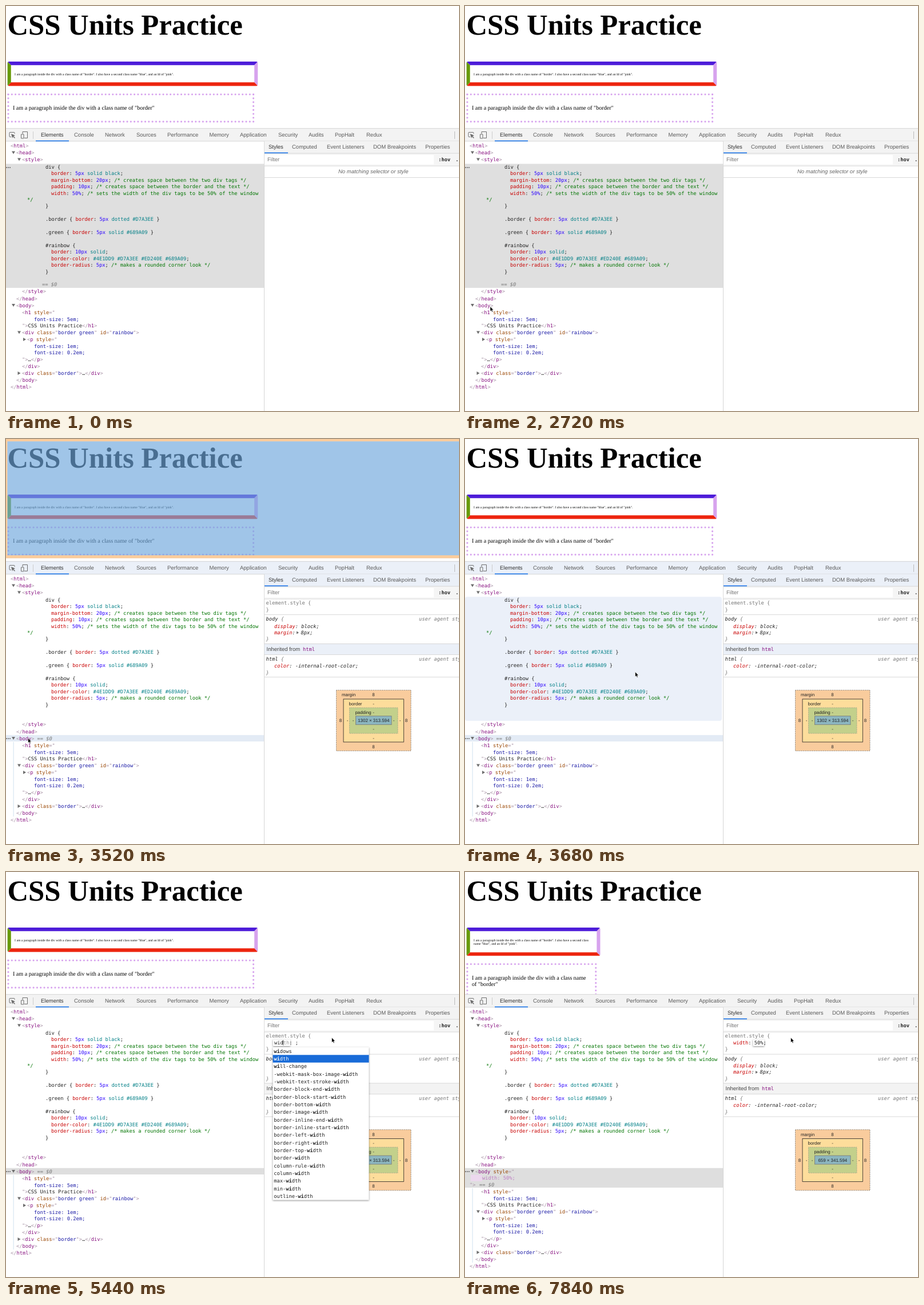
Recreate the animation shown at these times as an HTML page. Size 792x707 px, loop 8000 ms.

```html
<!DOCTYPE html>
<html lang="en">
<head>
<meta charset="utf-8">
<title>CSS Units Practice</title>
<style>
html, body { margin: 0; width: 100%; height: 100%; overflow: hidden; background: #fff; }
svg { display: block; }
text { white-space: pre; text-rendering: geometricPrecision; }
.m { font: 8.72px "DejaVu Sans Mono", monospace; }
.s { font: 9.5px "Liberation Sans", sans-serif; }
.x { font: 7.92px "Liberation Sans", sans-serif; text-anchor: middle; }
.p { font: 10.15px "Liberation Serif", serif; }
.q { font: 5.71px "Liberation Serif", serif; }
.h { font: bold 50.72px "Liberation Serif", serif; }
.i { font-style: italic; }
.b { font-weight: bold; }
.shadow { filter: drop-shadow(0 1px 1.5px rgba(0, 0, 0, .45)); }
</style>
</head>
<body>
<svg id="stage" width="792" height="707"></svg>
<script>
const stage = document.getElementById('stage');
const LOOP = 8000, STEP = 160, S = 0.634, CH = 5.25;

// Colour codes used inside strings as ~code
const INK = {
  b: '#a894a6', t: '#881280', a: '#994500', v: '#1a1aa6', k: '#222', r: '#c80000',
  n: '#2a00ff', l: '#007f86', c: '#007400', g: '#777', d: '#999'
};
const esc = s => s.replace(/&/g, '&amp;').replace(/</g, '&lt;');
const rect = (x, y, w, h, fill, more = '') =>
  `<rect x="${x}" y="${y}" width="${w}" height="${h}" fill="${fill}" ${more}/>`;
const path = (d, fill, more = '') => `<path d="${d}" fill="${fill}" ${more}/>`;

function text(x, y, s, cls = 'm', fill = INK.k) {
  const [first, ...rest] = s.split(/~(\w)/);
  let out = esc(first);
  for (let i = 0; i < rest.length; i += 2)
    out += `<tspan fill="${INK[rest[i]]}">${esc(rest[i + 1])}</tspan>`;
  return `<text x="${x}" y="${y}" class="${cls}" fill="${fill}">${out}</text>`;
}
const code = (x, mid, s, cls = '') => text(x, mid + 3, s, 'm ' + cls);
const open = (x, y) => path(`M${x} ${y - 2.5}h6l-3 5z`, '#6e6e6e');
const shut = (x, y) => path(`M${x} ${y - 3}v6l5 -3z`, '#6e6e6e');

// ---- web page ----
function rainbow(x, y, w, h) {
  const b = 10 * S, r = x + w, e = y + h;
  const side = (a, c) => `<polygon points="${a}" fill="${c}"/>`;
  return `<clipPath id="round">${rect(x, y, w, h, '#000', 'rx="3.2"')}</clipPath><g clip-path="url(#round)">` +
    side([x, y, r, y, r - b, y + b, x + b, y + b], '#4E1DD9') +
    side([r, y, r, e, r - b, e - b, r - b, y + b], '#D7A3EE') +
    side([r, e, x, e, x + b, e - b, r - b, e - b], '#ED240E') +
    side([x, e, x, y, x + b, y + b, x + b, e - b], '#689A09') + '</g>';
}

function dotted(x, y, w, h) {
  const b = 5 * S, x1 = x + b / 2, y1 = y + b / 2, W = w - b, H = h - b;
  const line = (d, len) => path(d, 'none', `stroke="#D7A3EE" stroke-width="${b}" stroke-linecap="round"
    stroke-dasharray="0 ${len / Math.round(len / (2 * b))}"`);
  return line(`M${x1} ${y1}h${W}`, W) + line(`M${x1} ${y1 + H}h${W}`, W) +
    line(`M${x1} ${y1}v${H}`, H) + line(`M${x1 + W} ${y1}v${H}`, H);
}

function page(width, overlay) {
  const x = 2.4, top = 50.3;
  if (width && width !== '50%')
    return ['CSS', 'Units', 'Practice'].map((s, i) => text(x, top + 92 * S * i, s, 'h', '#000')).join('');
  const half = width === '50%', body = half ? 659 : 1302;
  const small = 'I am a paragraph inside the div with a class name of "border". I also have a second class';
  const small2 = 'name "blue", and an Id of "pink".';
  const big = 'I am a paragraph inside the div with a class name', big2 = 'of "border"';
  const p = (y, s, cls) => text(x + (cls === 'p' ? 15 : 20) * S, y, s, cls, '#000');
  let out = text(x, top, 'CSS Units Practice', 'h', '#000') +
    rainbow(x, 97, (body / 2 + 40) * S, half ? 49.5 : 42.7) +
    dotted(x, half ? 159.2 : 152.7, (body / 2 + 30) * S, half ? 62.3 : 50.7);
  out += half
    ? p(120.7, small, 'q') + p(127.2, small2, 'q') + p(187.7, big, 'p') + p(199.3, big2, 'p')
    : p(120.7, small + ' ' + small2, 'q') + p(181.4, big + ' ' + big2, 'p');
  if (overlay) {
    out += path(`M0 0H792V208.2H0zM${x} 4.2V203H792V4.2z`, '#f9cc9d', 'fill-rule="evenodd"') +
      rect(x, 4.2, 790, 198.8, 'rgb(111,168,220)', 'opacity=".66"');
  }
  return out;
}

// ---- toolbar ----
function toolbar(bar) {
  const tabs = [['Elements', 61], ['Console', 119], ['Network', 173], ['Sources', 228], ['Performance', 282],
    ['Memory', 355.5], ['Application', 409], ['Security', 476], ['Audits', 529], ['PopHalt', 575], ['Redux', 630]];
  const line = 'stroke="#6e6e6e" stroke-width="1"';
  return rect(0, 213.4, 792, 494, '#fff') + rect(0, 213.4, 792, 22.6, bar) +
    rect(0, 213.4, 792, .8, '#ccc') + rect(0, 235.6, 792, .8, '#ccc') +
    path('M9 228.5H7q-1 0-1-1V221.5q0-1 1-1H14q1 0 1 1V223', 'none', line) +
    path('M9 223L16 226L13.3 227.2L16 230L15 231L12.2 228.3L11 230.8z', '#6e6e6e') +
    path('M29 223V219.5H37.5V230.5H32M26.5 224H31V231H26.5z', 'none', line) +
    rect(47, 219, 1, 13, '#ccc') + rect(784, 219, 1, 13, '#bbb') +
    rect(52, 234.7, 58, 1.6, '#1a73e8') +
    tabs.map(([s, x], i) => text(x, 228.4, s, 's', i ? '#5a5a5a' : '#333')).join('');
}

// ---- element tree ----
const SHEET = [
  [69, 'div {'],
  [79, '~rborder~k: ~n5px~l solid black~k;'],
  [79, '~rmargin-bottom~k: ~n20px~k; ~c/* creates space between the two div tags */'],
  [79, '~rpadding~k: ~n10px~k; ~c/* creates space between the border and the text */'],
  [79, '~rwidth~k: ~n50%~k; ~c/* sets the width of the div tags to be 50% of the window'],
  [37, '~c*/'],
  [69, '}'], null,
  [69, '.border { ~rborder~k: ~n5px~l dotted #D7A3EE~k }'], null,
  [69, '.green { ~rborder~k: ~n5px~l solid #689A09~k }'], null,
  [69, '#rainbow {'],
  [79, '~rborder~k: ~n10px~l solid~k;'],
  [79, '~rborder-color~k: ~l#4E1DD9 #D7A3EE #ED240E #689A09~k;'],
  [79, '~rborder-radius~k: ~n5px~k; ~c/* makes a rounded corner look */'],
  [69, '}']
];
const tag = name => `~b<~t${name}~b>`;
const end = name => `~b</~t${name}~b>`;
const attr = (name, val) => ` ~a${name}~b="~v${val}~b"`;
const REST = [
  [28, 535, '~b<~th1 ~astyle~b="'],
  [49, 546.5, '~vfont-size: 5em;'],
  [28, 558, '~b">~kCSS Units Practice' + end('h1')],
  [28, 570, '~b<~tdiv' + attr('class', 'border green') + attr('id', 'rainbow') + '>'],
  [37, 582, '~b<~tp ~astyle~b="'],
  [49, 593.5, '~vfont-size: 1em;'],
  [49, 605, '~vfont-size: 0.2em;'],
  [28, 616.5, '~b">~k…' + end('p')],
  [28, 628.5, end('div')],
  [28, 641, '~b<~tdiv' + attr('class', 'border') + '>~k…' + end('div')],
  [18, 653, end('body')],
  [8, 665, end('html')]
];
const dots = y => [1, 4, 7].map(x => `<circle cx="${x}" cy="${y}" r=".9" fill="#555"/>`).join('');

function tree(s) {
  const drop = s.width ? 23 : 0;
  let out = '';
  if (!s.picked) out += rect(0, 275.5, 451, 216.5, s.hover ? '#cfe6fa' : '#dfdfdf') + dots(282);
  else if (s.overSheet) out += rect(0, 275.5, 449, 216.5, '#ebf0f9', 'rx="4"');
  if (s.picked) out += rect(0, 516.8, 451, 11.2 + drop, s.tint ? '#e3ebf5' : '#dedede') + dots(523);
  else if (s.hover) out += rect(0, 516.5, 449, 12.5, '#ebf1fb', 'rx="5"');
  if (s.picked || s.hover) out += rect(12.6, 529 + drop, 1, 130, '#cfe0ee');

  out += code(8, 244, tag('html')) + open(10, 256) + code(18, 256, tag('head')) +
    open(20, 268) + code(28, 268, tag('style'));
  SHEET.forEach((l, i) => { if (l) out += code(l[0], 281 + 11.41 * i, l[1]); });
  if (!s.picked) out += code(63, 486.3, '~g== $0', 'i');
  out += code(28, 498.3, end('style')) + code(18, 510.5, end('head')) + open(10, 522.5);

  if (s.width) {
    const k = Math.min(1, Math.max(0, (s.age - 160) / 480));
    const mix = (a, b) => Math.round(a + (b - a) * k);
    const decl = `width: ${s.width};`;
    out += code(18, 522.5, '~b<~tbody ~astyle~b="') +
      (k ? rect(10, 528.5, 20, 11.2, '#ecd8ee') : '') +
      rect(10, 528.5, 20 + decl.length * CH, 11.2, '#a24c9f', `opacity="${1 - k}"`) +
      text(30, 537, decl, 'm', `rgb(${mix(255, 190)},${mix(255, 125)},${mix(255, 195)})`) +
      code(8, 545.5, '~b">') + code(25, 545.5, '~g== $0', 'i');
  } else {
    out += code(18, 522.5, tag('body'));
    if (s.picked) out += code(54.5, 522.5, '~g== $0', 'i');
  }
  out += `<g transform="translate(0 ${drop})">` +
    REST.map(l => code(...l)).join('') + open(20, 570) + shut(30, 582) + shut(20.5, 641) + '</g>';
  return out + rect(451, 236, .8, 471, '#ccc');
}

// ---- styles pane ----
function boxModel(size) {
  const dash = c => `stroke="${c}" stroke-width=".7" stroke-dasharray="1.6 1.6"`;
  const solid = c => `stroke="${c}" stroke-width=".8"`;
  const label = (x, mid, s) => text(x, mid + 2.8, s, 'x', '#222');
  let out = rect(577.5, 438.4, 130.5, 106, '#f9cc9d', dash('#444')) +
    rect(590, 454, 105.3, 75, '#fddd9b', solid('#222')) +
    rect(600.5, 469, 84.5, 45, '#c3d08b', dash('#888')) +
    rect(611.5, 483.7, 62.5, 15, '#8cb6c0', solid('#777'));
  [[599, 446.5, 'margin'], [611, 461.8, 'border'], [624.5, 477, 'padding'], [642.8, 491.5, size],
    [642.5, 446.5, '8'], [642.5, 537, '8'], [585, 491.5, '8'], [700, 491.5, '8'],
    [642.5, 461.8, '-'], [642.5, 521.8, '-'], [597, 491.5, '-'], [689, 491.5, '-'],
    [642.5, 477, '-'], [642.5, 506.5, '-'], [607, 491.5, '-'], [678, 491.5, '-']
  ].forEach(l => { out += label(...l); });
  return out;
}

const field = (x, chars) => rect(x - 2.3, 292.3, chars * CH + 4, 11.5, '#fff', 'class="shadow"');
const caret = x => rect(x - .4, 293.5, .7, 9, '#000');

function editRow(s) {
  const x = 469;
  if (s.naming) {
    const full = s.typed.length > 1 ? 'width' : s.typed, n = s.typed.length;
    return field(x, full.length) + code(x, 298.3, `${s.typed}~d${full.slice(n)}~k: ;`) + caret(x + n * CH);
  }
  const vx = x + 7 * CH;
  return code(x, 298.3, '~rwidth~k:') + field(vx, s.width.length) +
    code(vx, 298.3, s.width + ';') + (s.width === '50%' ? '' : caret(vx + s.width.length * CH));
}

const HINTS = ['widows', 'width', 'will-change', '-webkit-mask-box-image-width', '-webkit-text-stroke-width',
  'border-block-end-width', 'border-block-start-width', 'border-bottom-width', 'border-image-width',
  'border-inline-end-width', 'border-inline-start-width', 'border-left-width', 'border-right-width',
  'border-top-width', 'border-width', 'column-rule-width', 'column-width', 'max-width', 'min-width', 'outline-width'];

function hints() {
  const H = 13.33;
  return rect(466.5, 306, 168, 20 * H, '#fff', 'class="shadow"') +
    rect(466.5, 306 + H, 168, H, '#186bd8') +
    HINTS.map((s, i) => {
      const at = s.indexOf('wi'), on = i === 1, y = 315.8 + H * i, fill = on ? '#fff' : '#222';
      return text(468.3, y, s.slice(0, at), 'm', fill) +
        text(468.3 + at * CH, y, 'wi', 'm b', fill) +
        text(468.3 + (at + 2) * CH, y, s.slice(at + 2), 'm', fill);
    }).join('');
}

function styles(s, bar) {
  const tabs = [['Styles', 459], ['Computed', 500], ['Event Listeners', 561], ['DOM Breakpoints', 642], ['Properties', 733]];
  const rule = y => rect(451.8, y, 341, .8, '#d0d0d0');
  let out = rect(451.8, 236, 341, 21, bar) + rect(451.8, 257, 341, 22, '#f5f5f5') + rule(256.7) + rule(278.8) +
    rect(452, 255.6, 41, 1.6, '#1a73e8') + rect(452, 260, 296, 16.5, '#fff') +
    tabs.map(([n, x], i) => text(x, 249.3, n, 's', i ? '#5a5a5a' : '#333')).join('') +
    text(457, 271.3, 'Filter', 's', '#757575') + code(756, 268, ':hov', 'b') + code(786, 268, '.cls', 'b');
  if (!s.picked)
    return out + text(581, 292.3, 'No matching selector or style', 's i', '#666') + rule(299);

  out += code(454.5, 285.5, '~gelement.style {');
  if (s.edit) out += editRow(s);
  const sheet = y => code(722, y, '~guser agent stylesheet', 'i');
  out += `<g transform="translate(0 ${s.edit ? 11.4 : 0})">` +
    code(454.5, 297.5, '~g}') + rule(306.3) +
    code(454.5, 314.3, 'body ~g{', 'i') + sheet(314.3) +
    code(469, 326.8, '~rdisplay~k: block;', 'i') +
    code(469, 338, '~rmargin~k:', 'i') + path('M508 335.5v5l4 -2.5z', '#6e6e6e') + code(515.5, 338, '8px;', 'i') +
    code(454.5, 349.3, '~g}', 'i') +
    rect(451.8, 357.5, 341, 18.5, bar) + rule(357) + rule(376) +
    text(455.5, 370, 'Inherited from', 's', '#444') + code(519, 367, '~thtml') +
    code(454.5, 383.5, 'html ~g{', 'i') + sheet(383.5) +
    code(469, 396, '~rcolor~k: -internal-root-color;', 'i') +
    code(454.5, 407.5, '~g}', 'i') + rule(415.3) +
    boxModel(s.width === '50%' ? '659 × 341.594' : '1302 × 313.594') + '</g>';
  return out + (s.naming && (s.typed === 'wi' || s.typed === 'wid') ? hints() : '');
}

// ---- pointer ----
const TRACK = [[160, 296, 294], [960, 82, 550], [1440, 82, 550], [2400, 44, 524.5], [2720, 44, 524.5],
  [2880, 38.5, 522], [3520, 38.5, 522], [3680, 297.5, 406.5], [4320, 569.5, 289], [LOOP, 569.5, 289]];

function pointer(t) {
  const i = TRACK.findIndex(k => t < k[0]);
  if (i < 1) return null;
  const [a, b] = [TRACK[i - 1], TRACK[i]], k = (t - a[0]) / (b[0] - a[0]);
  return [a[1] + (b[1] - a[1]) * k, a[2] + (b[2] - a[2]) * k];
}
const arrow = ([x, y]) => path('M0 0V8.6L2 6.9L3.3 9.8L4.7 9.2L3.5 6.3H6z', '#000',
  `stroke="#fff" stroke-width=".6" transform="translate(${x} ${y})"`);

// Latest entry whose time has come: [value, start]
const latest = (list, t) => list.filter(e => t >= e[1]).pop() || ['', 0];
const NAME = [['w', 4960], ['wi', 5280], ['wid', 5440], ['width', 5600]];
const VALUE = [['5', 6560], ['50', 6880], ['50%', 7200]];

function draw(t) {
  const at = pointer(t), [width, since] = latest(VALUE, t);
  const s = {
    width, age: t - since,
    typed: latest(NAME, t)[0],
    hover: t >= 2880 && t < 3680,
    picked: t >= 3200,
    overSheet: t >= 3680 && at[0] < 450,
    tint: t >= 2880 && t < 4480,
    edit: t >= 4480,
    naming: t < 5760
  };
  const bar = s.tint ? '#ebf0f8' : '#f3f3f3';
  stage.innerHTML = page(width, s.hover) + toolbar(bar) + tree(s) + styles(s, bar) + (at ? arrow(at) : '');
}

let shown = -1;
const start = performance.now();
function tick() {
  const t = Math.floor((performance.now() - start) % LOOP / STEP) * STEP;
  if (t !== shown) draw(shown = t);
  requestAnimationFrame(tick);
}
tick();
</script>
</body>
</html>
```
